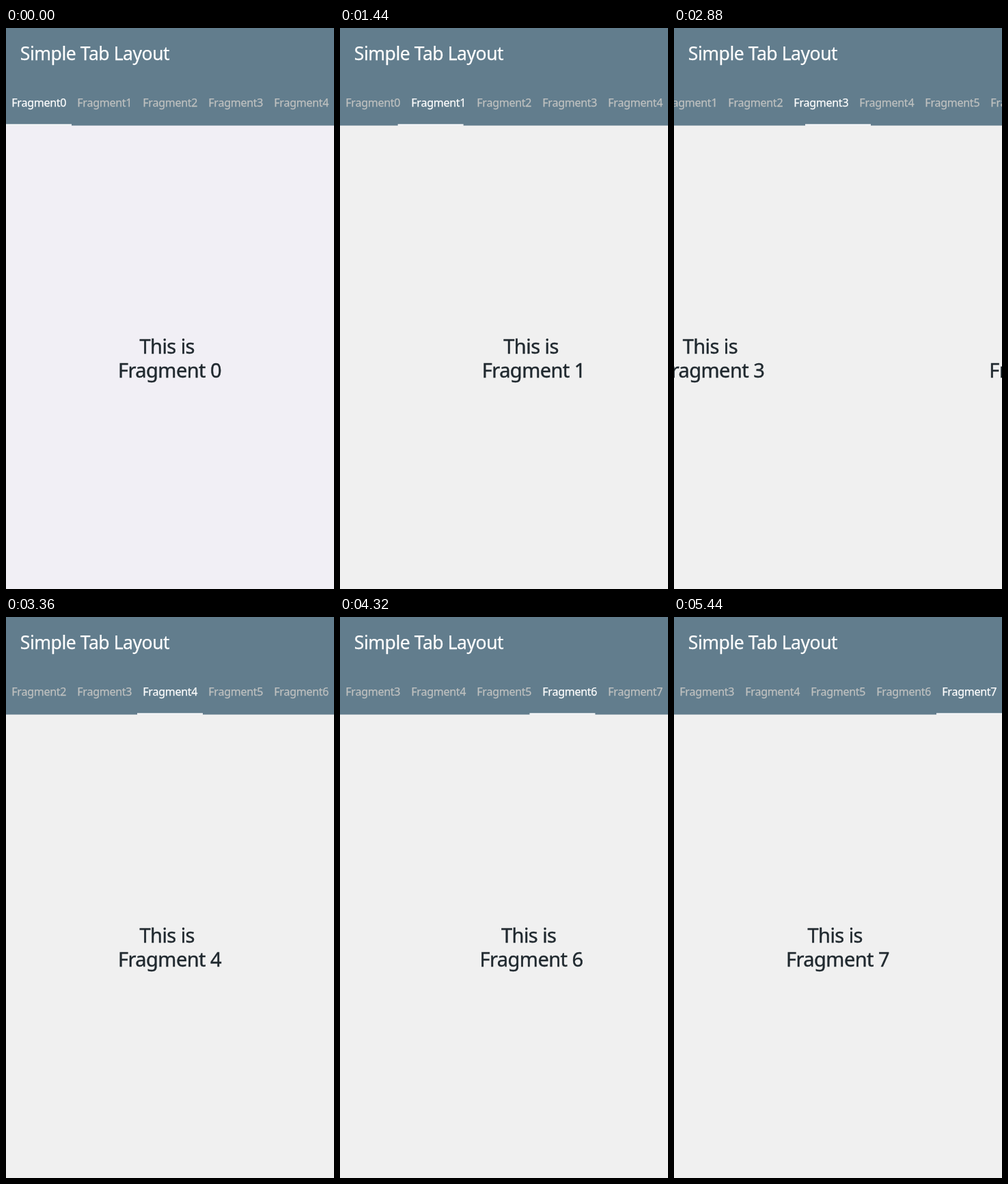
Recreate the animation shown at these times as an HTML page. Size 480x820 px, loop 5.6 s.

```html
<!DOCTYPE html>
<html lang="en">
<head>
<meta charset="utf-8">
<title>Simple Tab Layout</title>
<style>
  html, body { margin: 0; width: 100%; height: 100%; overflow: hidden; background: #f0f0f0; }
  svg { display: block; width: 480px; height: 820px; font-family: "Noto Sans", "Open Sans", sans-serif; }
  text { fill: var(--ink); stroke: var(--ink); stroke-width: 0.25px; }
  .title { --ink: #fff; font-size: 26.5px; letter-spacing: -0.45px; }
  .tab { --ink: #bfc1c0; font-size: 16px; letter-spacing: -0.25px; text-anchor: middle; }
  .tab.active { --ink: #fff; }
  .page { --ink: #20292f; font-size: 29px; letter-spacing: -0.55px; text-anchor: middle; stroke-width: 0.4px; }
</style>
</head>
<body>
<svg viewBox="0 0 480 820">
  <rect id="backdrop" width="480" height="820" fill="#f0f0f0"/>
  <g id="pages"></g>
  <rect width="480" height="142.6" fill="#627d8d"/>
  <text class="title" x="20.8" y="47">Simple Tab Layout</text>
  <g id="tabs"></g>
  <rect id="marker" y="140.5" width="96" height="2.3" fill="#fff"/>
</svg>
<script>
const LOOP = 5600, STEP = 160;
const COUNT = 8, PAGE_W = 480, TAB_W = 96;
const DRAG_MS = 90, DRAG = 0.15, FLING_MS = 500;
const TAB_LAG = 17;     // the tab strip trails the pages by one screen refresh
const TINT_MS = 1120;   // the backdrop starts slightly violet
const flings = [1260, 1838, 2345, 2849.3, 3513, 4135, 4759];

const byId = id => document.getElementById(id);
const pages = byId("pages"), tabs = byId("tabs");
const marker = byId("marker"), backdrop = byId("backdrop");

function addText(parent, cls, x, y, text) {
  const node = document.createElementNS("http://www.w3.org/2000/svg", "text");
  node.setAttribute("class", cls);
  node.setAttribute("x", x);
  node.setAttribute("y", y);
  node.textContent = text;
  parent.append(node);
  return node;
}

const labels = [];
for (let i = 0; i < COUNT; i++) {
  const x = i * PAGE_W;
  addText(pages, "page", x + 235.7, 476, "This is");
  addText(pages, "page", x + 239.5, 511, "Fragment " + i);
  labels.push(addText(tabs, "tab", i * TAB_W + 48.3, 115, "Fragment" + i));
}

const clamp = (v, lo, hi) => Math.min(hi, Math.max(lo, v));

// A short finger drag, then a quintic fling to the next page.
function swipe(dt) {
  if (dt < 0) return DRAG * clamp(1 + dt / DRAG_MS, 0, 1) ** 2;
  return 1 - (1 - DRAG) * (1 - Math.min(1, dt / FLING_MS)) ** 5;
}

const position = t => flings.reduce((sum, start) => sum + swipe(t - start), 0);
const moveX = (node, x) => node.setAttribute("transform", `translate(${x.toFixed(2)} 0)`);

function draw(t) {
  moveX(pages, -position(t) * PAGE_W);

  const pos = position(t - TAB_LAG);
  const scroll = clamp((pos - 2) * TAB_W, 0, COUNT * TAB_W - PAGE_W);
  moveX(tabs, -scroll);
  moveX(marker, pos * TAB_W - scroll);
  const active = Math.round(pos);
  labels.forEach((label, i) => label.classList.toggle("active", i === active));

  const tint = clamp(1 - t / TINT_MS, 0, 1);
  const rgb = [1, -1, 5].map(d => Math.round(240 + d * tint));
  backdrop.setAttribute("fill", `rgb(${rgb})`);
}

const begin = performance.now();
function tick() {
  const t = (performance.now() - begin) % LOOP;
  draw(Math.floor(t / STEP) * STEP);
  requestAnimationFrame(tick);
}
tick();
</script>
</body>
</html>
```
